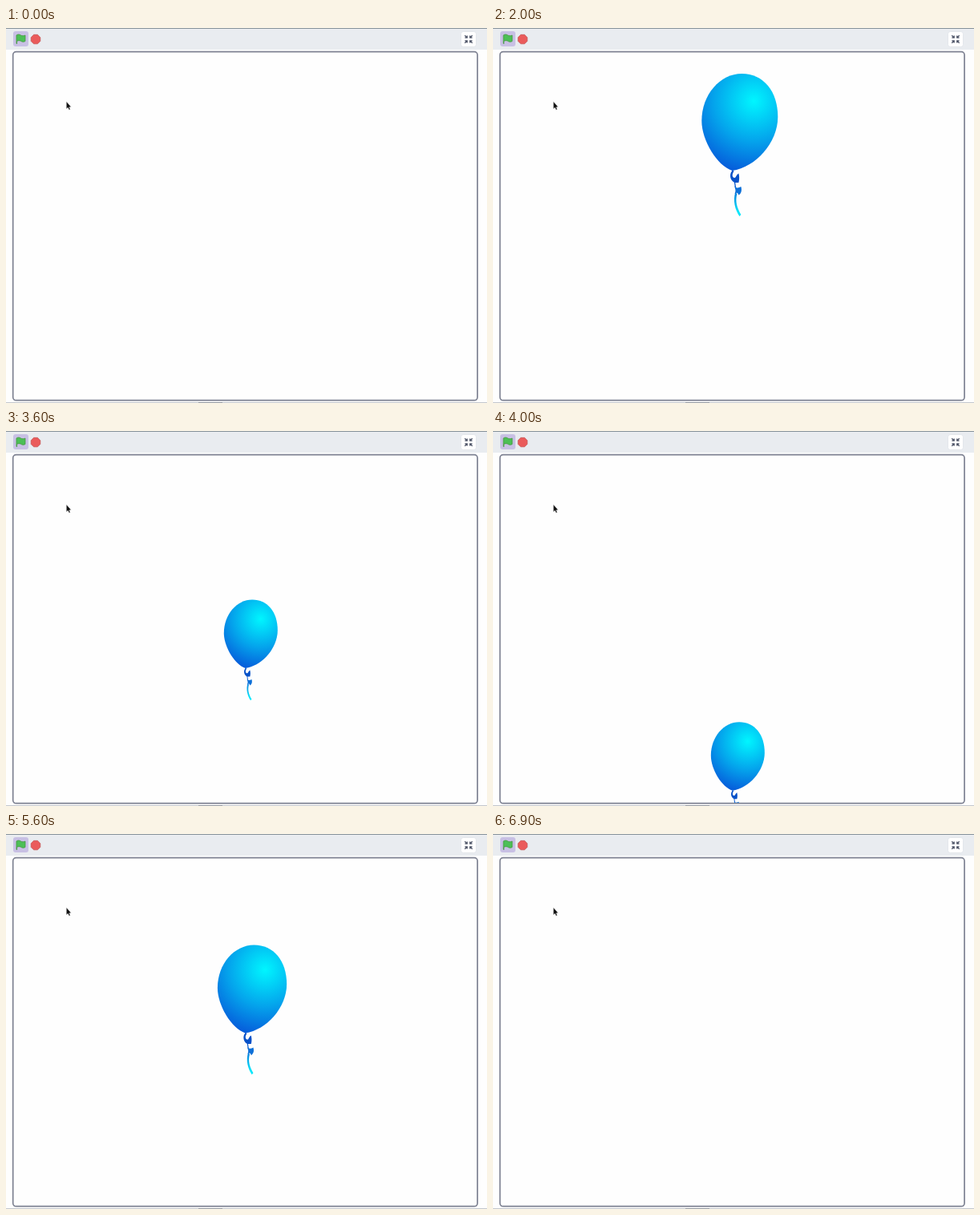
These frames come from a looping animation (600 px wide and 468 px high, 7.1 s). An HTML page:

```html
<!DOCTYPE html>
<html lang="en">
<head>
<meta charset="utf-8">
<title>Balloon</title>
<style>
  html, body { margin: 0; width: 100%; height: 100%; overflow: hidden; background: #fff; }
  svg { display: block; width: 600px; height: 468px; }
</style>
</head>
<body>
<svg viewBox="0 0 600 468" xmlns="http://www.w3.org/2000/svg">
  <defs>
    <radialGradient id="skin" gradientUnits="userSpaceOnUse" cx="26" cy="-86" r="100">
      <stop offset="0" stop-color="#00f6ff"/>
      <stop offset=".5" stop-color="#04a4ec"/>
      <stop offset="1" stop-color="#064bd6"/>
    </radialGradient>
    <linearGradient id="tail" gradientUnits="userSpaceOnUse" x1="0" y1="28" x2="0" y2="52">
      <stop offset="0" stop-color="#0b7cdc"/>
      <stop offset="1" stop-color="#08e6fb"/>
    </linearGradient>
    <clipPath id="inside"><rect x="9.5" y="30.5" width="578" height="433.5" rx="3"/></clipPath>
  </defs>

  <rect width="600" height="468" fill="#fefefe"/>
  <rect width="600" height="27" fill="#e9ecf0"/>
  <rect width="600" height="1" fill="#86929a"/>
  <rect y="467" width="600" height="1" fill="#c3c7cd"/>
  <rect x="240" y="467" width="30" height="1" fill="#92969e"/>

  <!-- toolbar -->
  <rect x="9" y="4" width="19" height="19" rx="3" fill="#c8c0e4"/>
  <path d="M13 9C15 7.5 17 8 18.500 9S22 10 24 9V16.500C22 17.800 20 17.300 18.500 16.300S15 15.500 13.600 16.500V19.500H13Z"
        fill="#4cbf56" stroke="#45993d" stroke-width=".8" stroke-linejoin="round"/>
  <path d="M34.600 8.300H39.400L42.800 11.700V16.400L39.400 19.800H34.600L31.200 16.400V11.700Z"
        fill="#ea5b5b" stroke="#c0504f" stroke-width=".7"/>
  <rect x="567.500" y="4.500" width="19" height="19" rx="3" fill="#fff" stroke="#dfe3e8" stroke-width=".8"/>
  <g id="arrows" fill="none" stroke="#4f5568" stroke-width="1.300"></g>

  <rect x="8.700" y="29.700" width="579.400" height="435" rx="4" fill="#fefefe" stroke="#7e8292" stroke-width="1.700"/>

  <g clip-path="url(#inside)">
    <g id="balloon" visibility="hidden">
      <path d="M3 28C-.5 38 2.500 50 8 58L10 56C5 47 2.500 40 5 30Z" fill="url(#tail)"/>
      <path d="M2 15L3.500 24" stroke="#0a58cc" stroke-width="1.300"/>
      <path d="M1 19C3 23 6 23 10 21C11.500 26 10 30 7 31.500C6 28 5 28 2 30C4 26 3 23 1 19Z" fill="#0d70d8"/>
      <path d="M0 0C-5 4 -4.500 13 2 16H7C8 12 8 8 7 4.500C5 5.500 4 8 3 9.500C0 11 -2.500 7 1 2Z" fill="#0751c8"/>
      <path d="M-1 1C-20 -5 -39.100 -37 -39.100 -61C-39.100 -94 -16 -120 11 -120C38 -120 55.900 -98 55.900 -66C55.900 -34 28 -3 -1 1Z" fill="url(#skin)"/>
    </g>
  </g>

  <path d="M75.300 91.800V101L77.300 99.300L78.700 102.200L80.200 101.500L78.900 98.700L81.300 98.400Z"
        fill="#111" stroke="#fff" stroke-width=".4"/>
</svg>
<script>
  const LOOP = 7100, STEP = 100;
  const HOME = { x: 299.4, y: 247.5 };
  const FULL = 95;      // width of the drawing at scale 1
  const GROWTH = 7.25;  // width gained per step
  const SPEED = 0.57;   // distance per step, relative to width
  const EDGE = { top: 48, bottom: 446 };

  // zero: moment of zero width; free: moment of release; dir: -1 up, 1 down
  const runs = [
    { show: 700,  zero: 460,  free: 1870, hide: 2500, max: 95,  dir: -1 },
    { show: 2700, zero: 2575, free: 3475, hide: 4300, max: 67,  dir: 1 },
    { show: 4500, zero: 4410, free: 6193, hide: 6800, max: 124, dir: 1 }
  ];

  const balloon = document.getElementById('balloon');
  const arrows = document.getElementById('arrows');

  for (const turn of [0, 90, 180, 270]) {
    const p = document.createElementNS('http://www.w3.org/2000/svg', 'path');
    p.setAttribute('d', 'M1.800 4.600V1.800H4.600M2 2L4.700 4.700');
    p.setAttribute('transform', `translate(577 14) rotate(${turn})`);
    arrows.append(p);
  }

  function place(run, t) {
    const width = Math.min(run.max, GROWTH * (t - run.zero) / STEP);
    const scale = width / FULL;
    const shift = run.dir * SPEED * width * Math.max(0, t - run.free) / STEP;
    const highest = EDGE.top - 58 * scale;
    const lowest = EDGE.bottom + 120 * scale;
    const y = Math.min(lowest, Math.max(highest, HOME.y + shift));
    balloon.setAttribute('transform', `translate(${HOME.x} ${y}) scale(${scale})`);
  }

  const start = performance.now();

  function draw() {
    const now = (performance.now() - start) % LOOP;
    const t = Math.floor(now / STEP) * STEP;
    const run = runs.find(r => t >= r.show && t < r.hide);
    balloon.setAttribute('visibility', run ? 'visible' : 'hidden');
    if (run) place(run, t);
    requestAnimationFrame(draw);
  }
  draw();
</script>
</body>
</html>
```
